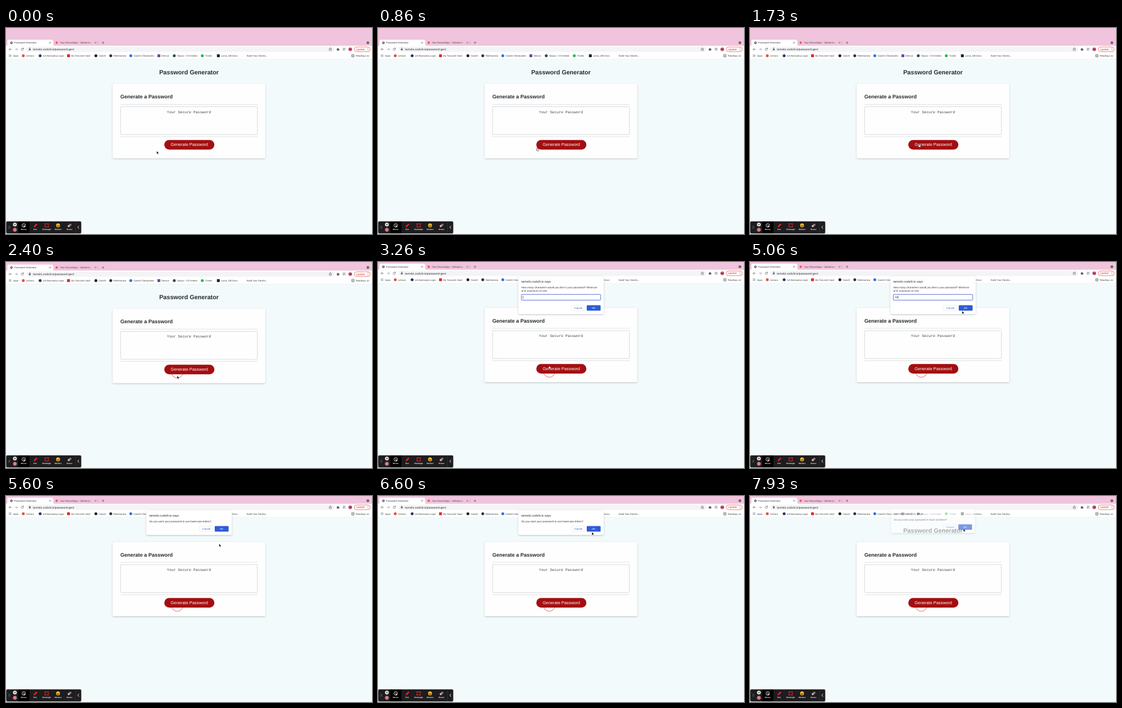
These frames come from a looping animation (640 px wide and 360 px high, 8 s). An HTML page:

```html
<!DOCTYPE html>
<html lang="en">
<head>
<meta charset="utf-8">
<title>Password Generator</title>
<style>
  html, body { margin: 0; width: 100%; height: 100%; overflow: hidden; background: #f3fafb; }
  svg { display: block; width: 100vw; height: 100vh; }
  text { font-family: "Liberation Sans", Arial, sans-serif; text-rendering: geometricPrecision; white-space: pre; }
  .mono { font-family: "Liberation Mono", monospace; }
  .line { fill: none; stroke: #5f6368; stroke-width: .7; stroke-linecap: round; stroke-linejoin: round; }
</style>
</head>
<body>
<svg id="stage" viewBox="0 0 640 360">
  <defs>
    <filter id="soft" x="-10%" y="-10%" width="120%" height="130%">
      <feDropShadow dx="0" dy="1" stdDeviation="1.6" flood-color="#000" flood-opacity=".24"/>
    </filter>
    <linearGradient id="tabFade" x1="0" x2="1">
      <stop offset="0" stop-color="#f0c4dc" stop-opacity="0"/><stop offset="1" stop-color="#f0c4dc"/>
    </linearGradient>
  </defs>
</svg>
<script>
const LOOP = 8000, FRAME = 1000 / 15, BAR = 17.4;
const HOST = 'tamvilo.codvilt.io';

const text = (x, y, str, size, fill = '#3c4043', more = '') =>
  `<text x="${x}" y="${y}" font-size="${size}" fill="${fill}" ${more}>${str}</text>`;
const rect = (x, y, w, h, fill, r = 0, more = '') =>
  `<rect x="${x}" y="${y}" width="${w}" height="${h}" rx="${r}" fill="${fill}" ${more}/>`;
const dot = (x, y, r, fill, more = '') => `<circle cx="${x}" cy="${y}" r="${r}" fill="${fill}" ${more}/>`;
const line = (d, more = '') => `<path class="line" d="${d}" ${more}/>`;
const group = (id, body, more = '') => `<g id="${id}" ${more}>${body}</g>`;
const MID = 'text-anchor="middle"', BOLD = 'font-weight="700"';

function bookmarks() {
  const items = [
    [35, 'Letvora', '#dd5144'], [64.5, 'UA Bootcamp Login', '#27365e'],
    [114, 'My TovLatch Vault', '#d32d2f', 1], [162, 'Codvilt', '#1b1f23'],
    [188, 'Reelmarrow', '#2b3440'], [223, 'Codvilt Cheatcodes', '#2f6fe0'],
    [272, 'Nimvar', '#6b4a98', 1], [299, 'Stayvo - 03 Greeds', '#2b4a50'],
    [348, 'Trivelo', '#1db954'], [376, 'Larvo_DB Docs', '#10291f', 1],
    [421, 'Build Your Develo…']
  ];
  let out = '';
  for (let i = 0; i < 9; i++)
    out += rect(5.2 + i % 3 * 1.5, 46.4 + Math.floor(i / 3) * 1.5, 1, 1, ['#d9534f', '#4a86e8', '#4caf50'][i % 3]);
  out += text(12.5, 50, 'Apps', 4.15);
  for (const [x, label, color, square] of items) {
    if (color) out += square ? rect(x - 7.2, 46, 5, 5, color, .5) : dot(x - 4.8, 48.5, 2.5, color);
    out += text(x, 50, label, 4.15);
  }
  return out + rect(604.4, 46.2, 4.4, 4.6, 'none', .5, 'stroke="#5f6368" stroke-width=".7"') +
    line('M605.6 47.8h2M605.6 49.3h2') + text(611.8, 50, 'Reading List', 4.15);
}

function browserTop() {
  const cross = (x, y) => line(`M${x - 1.2} ${y - 1.2}l2.4 2.4m0-2.4l-2.4 2.4`);
  return rect(0, 0, 640, 32, '#f0c4dc') +
    '<path d="M0 31.5Q2.5 31.5 2.5 29V23Q2.5 20.5 5 20.5H80Q82.5 20.5 82.5 23V29Q82.5 31.5 85 31.5Z" fill="#fff"/>' +
    rect(0, 31, 640, 23.6, '#fff') + rect(0, 54.2, 640, .4, '#dfe3e5') +
    dot(9.5, 25.7, 2.3, '#50555b') + line('M7.6 25h2l.6 1.4M10.2 23.7l1 1', 'style="stroke:#fff"') +
    text(14.3, 27.2, 'Password Generator', 4.25, '#33363a') + cross(77, 25.7) +
    dot(88.6, 25.7, 2.1, '#ee5963') +
    text(94.3, 27.2, 'Your Recordings - Vidmarlow', 4.25, '#4b4148') +
    rect(142, 22, 10.5, 8, 'url(#tabFade)') + cross(156.5, 25.7) +
    line('M160.8 23v5.4', 'style="stroke:#b58ea4;stroke-width:.4"') +
    line('M167.6 25.7h4M169.6 23.7v4') +
    dot(632.8, 25.7, 2.3, '#4b4148') + line('M631.7 25.3l1.1 1.1 1.1-1.1', 'style="stroke:#fff"') +
    line('M9.7 37.2H5.4m1.9-1.9l-1.9 1.9 1.9 1.9') +
    line('M15.8 37.2h4.3m-1.9-1.9l1.9 1.9-1.9 1.9', 'opacity=".65"') +
    line('M30.5 36.2a2.1 2.1 0 1 0 .1 1.8M30.7 34.8v1.6h-1.6') +
    rect(35.5, 32.8, 539, 9, '#f3f4f5', 4.5) +
    rect(40, 36.4, 3.2, 2.6, '#5f6368', .4) + line('M40.7 36.2v-.6a.9.9 0 0 1 1.8 0v.6') +
    text(47.2, 39, `${HOST}/password-gen/`, 5.08, '#2b2e31') +
    line('M567.2 34.7l.8 1.7 1.8.2-1.4 1.2.4 1.8-1.6-.9-1.6.9.4-1.8-1.4-1.2 1.8-.2z') +
    rect(578.5, 36, 3.7, 3.5, '#5f6368', .4) + dot(580.3, 35.8, .9, '#5f6368') + dot(582.4, 37.6, .9, '#5f6368') +
    line('M589.2 35.4h4M589.2 37.1h4M589.2 38.8h2M593 38.8h.6') +
    dot(602, 37.2, 3.2, '#c75b7b') + rect(599.4, 36.5, 5.2, 1.5, '#72364d', .5) +
    rect(609, 33.2, 28, 8.1, '#fff', 4, 'stroke="#d93025" stroke-width=".6"') +
    text(612.2, 38.9, 'Update', 4.7, '#d93025') +
    [35.4, 37.2, 39].map(y => dot(633, y, .5, '#d93025')).join('') + bookmarks();
}

function page() {
  const rule = y => rect(200, y, 240, .6, '#cdcfd2');
  return text(320, 81.3, 'Password Generator', 10.63, '#24292e', `${MID} ${BOLD}`) +
    rect(186.7, 97.7, 266.6, 129.8, '#fefefe', 1.6, 'filter="url(#soft)"') +
    text(200, 123.4, 'Generate a Password', 9, '#24292e', BOLD) + rule(133) +
    rect(200.4, 137.4, 239.2, 48.8, 'none', 1, 'stroke="#b4b6b9" stroke-width=".8" stroke-dasharray="2.2 1.3"') +
    text(320, 148.6, 'Your Secure Password', 6.42, '#444', `${MID} class="mono"`) + rule(189.6) +
    `<circle id="ring" cx="299.5" cy="208.5" fill="none" stroke="#e2574c" stroke-width="1"/>` +
    rect(276.8, 195.7, 87.6, 16.7, '#a30f11', 8.35) +
    text(320.6, 206.4, 'Generate Password', 7.36, '#fff', MID);
}

function dialog(id, lines, hasInput) {
  const top = hasInput ? 75.4 : 52.6;
  const body = rect(245.5, 25, 149, hasInput ? 66 : 43, '#fff', 1.8, 'filter="url(#soft)"') +
    text(250.7, 35.8, `${HOST} says`, 5.33, '#202124') +
    lines.map((s, i) => text(250.7, 45.5 + i * 6.6, s, 4.58, '#303236')).join('') +
    (hasInput ? rect(250.7, 56.7, 138.6, 10, '#fff', .8, 'stroke="#4a63d6" stroke-width=".9"') +
      `<text id="typed" x="253.4" y="63.4" font-size="4.7" fill="#202124"></text>` +
      rect(253.3, 59.2, .6, 5, '#222', 0, 'id="caret"') : '') +
    rect(338.3, top, 24, 9.7, '#fff', 1.4, 'stroke="#dadce0" stroke-width=".5"') +
    text(350.3, top + 6.4, 'Cancel', 4.5, '#2c59d0', MID) +
    rect(365, top, 24.3, 9.7, '#2e5bd6', 1.4) +
    text(377.1, top + 6.4, 'OK', 4.5, '#fff', MID);
  return group(id, body);
}

function recorder() {
  const tools = ['Mouse', 'Pen', 'Rectangle', 'Stickers', 'Eraser'];
  const icons = [
    dot(31, 345, 3.1, 'none', 'stroke="#fff" stroke-width=".8"') + '<path d="M30.5 344l3.8 3.4-1.7.2-1 1.5z" fill="#fff" stroke="#d33" stroke-width=".5"/>',
    '<path d="M48.3 348.2l.8-2.4 4.2-4 1.4 1.5-4.1 4.1z" fill="#ef2b32"/>',
    rect(68.2, 342.3, 5.8, 5.4, 'none', 0, 'stroke="#ef2b32" stroke-width=".9"') +
      [68.2, 74].map(x => dot(x, 342.3, .7, '#ef2b32') + dot(x, 347.7, .7, '#ef2b32')).join(''),
    dot(91, 345, 3.4, '#f6c12f') + dot(89.8, 344.2, .5, '#4a3210') + dot(92.2, 344.2, .5, '#4a3210') +
      '<path d="M89 345.6h4a2 2 0 0 1-4 0z" fill="#8b3b1c"/>',
    '<g transform="rotate(-40 111 345)">' + rect(107.6, 343.4, 4, 3.4, '#f0a7a2', .6) + rect(110.6, 343.4, 4, 3.4, '#7d7f86', .5) + '</g>'
  ];
  let out = rect(.5, 338, 131, 21, '#1d1d1f', 2, 'stroke="#555" stroke-width=".4"') +
    rect(21.5, 338.2, 19.5, 20.6, '#000');
  for (let i = 0; i < 6; i++) out += dot(5 + i % 2 * 1.8, 346.4 + Math.floor(i / 2) * 1.8, .5, '#99999c');
  out += dot(15.5, 343.4, 3.2, '#fff') + rect(14.2, 342, .9, 2.8, '#222') + rect(15.9, 342, .9, 2.8, '#222') +
    dot(15.5, 352.6, 2.8, '#e5262d', 'stroke="#fff" stroke-width=".7"') + rect(14.6, 351.7, 1.8, 1.8, '#fff');
  tools.forEach((name, i) => out += icons[i] + text(31 + 20 * i, 353.4, name, 3.2, '#fff', `${MID} ${BOLD}`));
  return out + rect(121, 338.2, .4, 20.6, '#48484b') + line('M127.3 346l-1.8 2.2 1.8 2.2', 'style="stroke:#fff;stroke-width:.9"');
}

const pointer = '<path id="arrow" d="M0 0V5.2L1.25 4.1 2.1 6 3 5.6 2.2 3.8H3.9Z" fill="#000" stroke="#fff" stroke-width=".4"/>' +
  '<path id="hand" d="M-.5 0Q.1-.6.6 0V2L2.8 2.5Q3.3 2.7 3.1 3.5L2.6 5.6H-.3L-1.7 3.4Q-1.5 2.6-.5 3.3Z" fill="#f5e9e9" stroke="#2a0505" stroke-width=".45"/>';

const stage = document.getElementById('stage');
stage.insertAdjacentHTML('beforeend',
  rect(0, 0, 640, 360, '#f3fafb') +
  group('browser', page() + browserTop()) +
  dialog('length', ['How many characters would you like in your password? Minimum', 'of 8, maximum of 128.'], true) +
  dialog('lower', ['Do you want your password to use lowercase letters?']) +
  dialog('upper', ['Do you want your password to use uppercase letters?']) +
  dialog('digits', ['Do you want your password to have numbers?']) +
  recorder() + group('cursor', pointer));

const part = id => document.getElementById(id);
const clamp = v => Math.max(0, Math.min(1, v));
const ease = p => p * p * (3 - 2 * p);

// time, x, y of the pointer tip
const path = [
  [0, 263.5, 215], [350, 263.5, 215], [1300, 295.5, 202.6], [1800, 295.5, 202.6], [2080, 299.3, 205],
  [2300, 299.3, 205], [2600, 299.3, 181], [3350, 299.2, 181], [3900, 299.2, 174.4], [4500, 299.2, 174.4],
  [5050, 372.6, 83.4], [5650, 372.6, 83.4], [6450, 374, 63], [6700, 374, 63], [7100, 373.2, 57], [LOOP, 373.2, 57]
];
// when each dialog starts to open and to close
const spans = { length: [2430, 5180], lower: [5330, 7000], upper: [7180, 7640], digits: [7843, LOOP + 500] };
const typing = [[4350, '1'], [4480, '10']];

function pointerAt(t) {
  const i = path.findIndex(k => k[0] > t), [t0, x0, y0] = path[i - 1], [t1, x1, y1] = path[i];
  const p = ease((t - t0) / (t1 - t0));
  return [x0 + (x1 - x0) * p, y0 + (y1 - y0) * p];
}

function draw(time) {
  const t = Math.floor((time % LOOP + 5) / FRAME) * FRAME % LOOP;
  const lift = ease(clamp((t - 2150) / 300));
  part('browser').setAttribute('transform', `translate(0 ${-BAR * lift})`);

  for (const id in spans) {
    const [open, close] = spans[id];
    const p = Math.min(clamp((t - open) / 150), clamp((close + 130 - t) / 130));
    const s = 1 - .0375 * (1 - p);
    part(id).setAttribute('opacity', p);
    part(id).setAttribute('transform', `translate(${320 * (1 - s)} ${45 * (1 - s) - 7.5 * (1 - p)}) scale(${s})`);
  }

  const typed = typing.filter(k => k[0] <= t).map(k => k[1]).pop() || '';
  part('typed').textContent = typed;
  part('caret').setAttribute('x', 253.3 + typed.length * 2.62);
  part('caret').setAttribute('opacity', t % 1000 < 530 ? 1 : 0);

  const click = clamp((t - 2080) / 200);
  part('ring').setAttribute('r', 10.3 * click);
  part('ring').setAttribute('opacity', click ? .9 : 0);

  const [x, y] = pointerAt(t);
  const top = 195.7 - BAR * lift;
  const onButton = x > 277 && x < 364 && y > top && y < top + 16.7;
  part('cursor').setAttribute('transform', `translate(${x} ${y})`);
  part('arrow').setAttribute('opacity', onButton ? 0 : 1);
  part('hand').setAttribute('opacity', onButton ? 1 : 0);
}

const start = performance.now();
function tick() {
  draw(performance.now() - start);
  requestAnimationFrame(tick);
}
tick();
</script>
</body>
</html>
```
